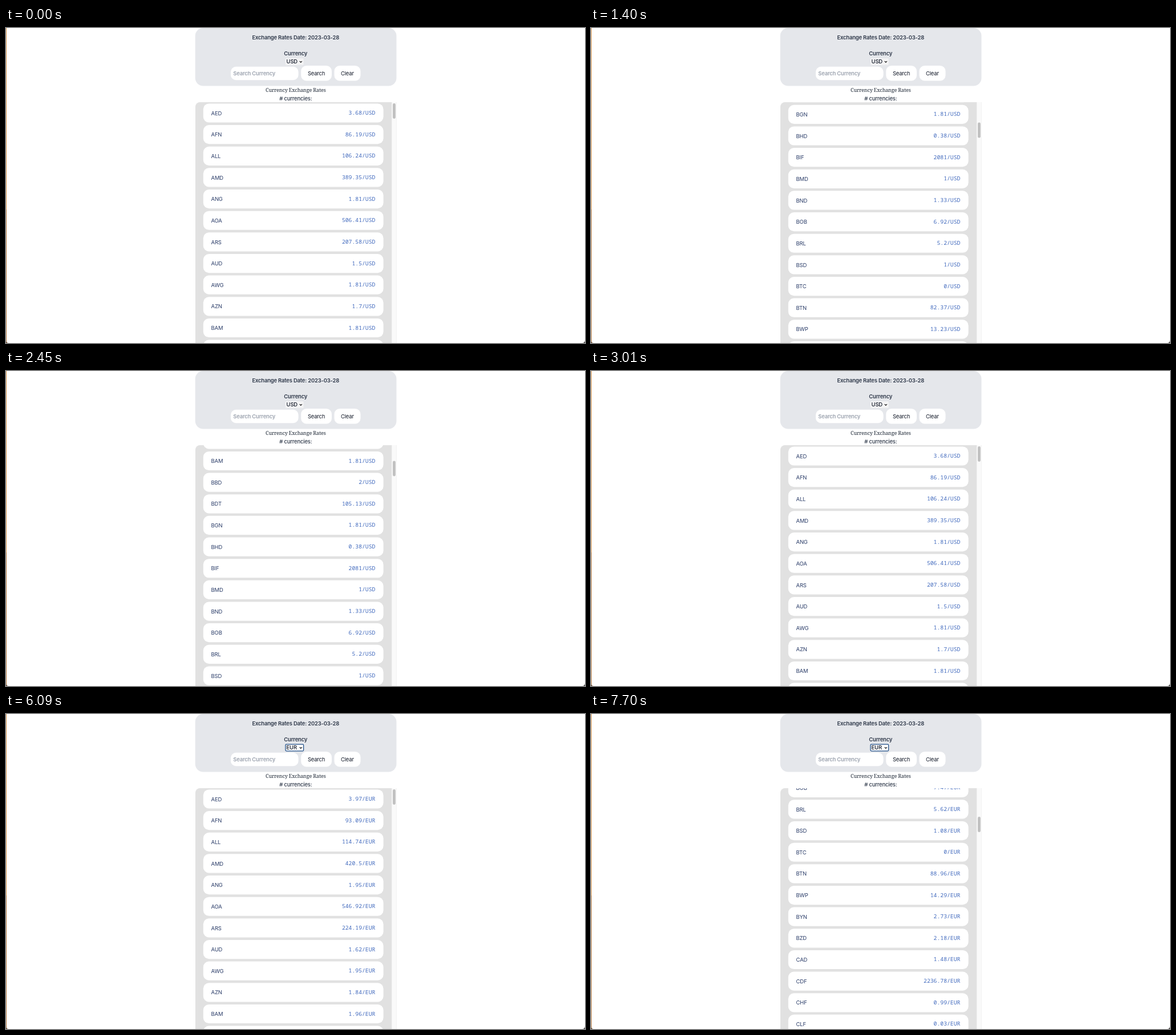
These frames come from a looping animation (1015x552 px, 8000 ms). An HTML page:

```html
<!DOCTYPE html>
<html lang="en">
<head>
<meta charset="utf-8">
<title>Exchange rates</title>
<style>
  html, body { margin: 0; width: 100%; height: 100%; overflow: hidden; background: #fff; }
  svg { display: block; width: 100vw; height: 100vh; }
  text { font: 400 9.47px Inter, sans-serif; letter-spacing: -.021em; fill: #111827; }
  .mid { text-anchor: middle; }
  .medium { font-weight: 500; }
  .semi { font-weight: 600; }
  .slate { fill: #2d3748; }
  .hint { fill: #9ca3af; }
  .serif { font: 400 9px "Noto Serif", serif; letter-spacing: -.15px; fill: #1f2937; }
  .code { fill: #2a3c68; }
  .rate { font: 400 9.75px "Noto Sans Mono", monospace; letter-spacing: 0; text-anchor: end; fill: #4069bd; }
</style>
</head>
<body>
<svg viewBox="0 0 1015 552" preserveAspectRatio="none">
  <defs>
    <clipPath id="view"><path d="M332 552V138a8 8 0 0 1 8-8H676V552Z"/></clipPath>
    <filter id="shade" x="-30%" y="-30%" width="160%" height="160%">
      <feDropShadow dx="0" dy="1.5" stdDeviation="1.8" flood-opacity=".28"/>
    </filter>
  </defs>

  <rect width="1015" height="552" fill="#fff"/>
  <rect width="1" height="318" fill="#dc9a50"/>
  <rect y="318" width="1" height="234" fill="#b87c42"/>
  <path d="M0 547Q0 552 5 552H0Z" fill="#5b3d25"/>
  <path d="M1015 547Q1015 552 1010 552H1015Z" fill="#3a3836"/>

  <rect x="331.7" width="352.8" height="101.5" rx="14" fill="#e5e7eb"/>
  <text class="mid semi slate" x="507.8" y="20">Exchange Rates Date: 2023-03-28</text>
  <text class="mid semi slate" x="507.8" y="48.2">Currency</text>

  <rect id="select" x="490" y="53.2" width="31.6" height="11.6" rx="1.5"/>
  <text id="chosen" class="medium" x="491.6" y="62.3"></text>
  <path d="M514.7 58.1l2.1 2.1 2.1-2.1" fill="none" stroke="#111" stroke-width="1.1"/>

  <g fill="#fff">
    <rect x="394" y="67.8" width="118.6" height="23.4" rx="9"/>
    <rect x="517.2" y="66" width="53.8" height="26.6" rx="9.5"/>
    <rect x="575.5" y="66" width="46" height="26.6" rx="9.5"/>
  </g>
  <text class="semi hint" x="398.2" y="82.9">Search Currency</text>
  <text class="mid" x="544" y="83">Search</text>
  <text class="mid" x="598.4" y="83">Clear</text>

  <text class="mid serif" x="507.8" y="111.8">Currency Exchange Rates</text>
  <text class="mid medium slate" x="507.8" y="126.6"># currencies:</text>

  <g clip-path="url(#view)">
    <rect x="331" y="130" width="346" height="422" fill="#e1e1e1"/>
    <g id="list"></g>
  </g>
  <rect x="676" y="130" width="8.6" height="422" fill="#fafafa"/>
  <path d="M676.3 130V552M684.3 130V552" stroke="#ececec" stroke-width=".6"/>
  <rect id="thumb" x="678" width="4.9" height="27" rx="2.45" fill="#c1c1c1"/>

  <g id="menu">
    <rect x="484.6" y="50" width="42.6" height="51" rx="4" fill="#ebe5e1"
      stroke="#aaa6a3" stroke-width=".6" filter="url(#shade)"/>
    <rect id="bar" x="487.4" width="36.8" height="15.2" rx="2.6" fill="#4197fb"/>
    <path id="tick" d="M490.2 60.6l1.8 2.5 3.2-6.2" fill="none" stroke-width="1.1"
      stroke-linecap="round" stroke-linejoin="round"/>
    <g id="options"></g>
  </g>
</svg>

<script>
const LOOP = 8000, STEP = 70, PITCH = 37.65, BAR_RATIO = .069;
const NS = "http://www.w3.org/2000/svg";
const $ = id => document.getElementById(id);

// code, rate per USD, rate per EUR
const RATES = `AED 3.68 3.97,AFN 86.19 93.09,ALL 106.24 114.74,AMD 389.35 420.5,ANG 1.81 1.95,
AOA 506.41 546.92,ARS 207.58 224.19,AUD 1.5 1.62,AWG 1.81 1.95,AZN 1.7 1.84,BAM 1.81 1.96,
BBD 2 2.16,BDT 105.13 113.54,BGN 1.81 1.96,BHD 0.38 0.41,BIF 2081 2247.48,BMD 1 1.08,
BND 1.33 1.44,BOB 6.92 7.47,BRL 5.2 5.62,BSD 1 1.08,BTC 0 0,BTN 82.37 88.96,BWP 13.23 14.29,
BYN 2.53 2.73,BZD 2.02 2.18,CAD 1.37 1.48,CDF 2071.09 2236.78,CHF 0.92 0.99,CLF 0.03 0.03,
CLP 793.5 856.98,CNH 6.88 7.43,CNY 6.88 7.43,COP 4698.2 5074.06`
  .split(",").map(row => row.trim().split(" "));

// start time, number of steps, scroll from, scroll to
const SCROLLS = [
  [560, 5, 0, 420],
  [1330, 5, 420, 780],
  [2240, 4, 780, 368],
  [2800, 4, 368, 0],
  [7420, 5, 0, 697.4]
];
const OPEN = 4620, HOVER = 5040, PICK = 5740;

function add(parent, tag, attrs, label = "") {
  const el = document.createElementNS(NS, tag);
  for (const key in attrs) el.setAttribute(key, attrs[key]);
  el.textContent = label;
  return parent.appendChild(el);
}

const rateTexts = RATES.map(([code], i) => {
  const y = 132.4 + i * PITCH;
  add($("list"), "rect", { x: 345.8, y, width: 315.8, height: 33.2, rx: 10, fill: "#fff" });
  add($("list"), "text", { class: "code", x: 359.6, y: y + 20.2 }, code);
  return add($("list"), "text", { class: "rate", x: 647.4, y: y + 19.6 });
});

const options = ["USD", "EUR", "CAD"].map((name, i) =>
  add($("options"), "text", { class: "medium", x: 498, y: 63 + i * 15.2 }, name));

const smooth = p => p * p * (3 - 2 * p);

function scrollAt(t) {
  let pos = 0;
  for (const [start, steps, from, to] of SCROLLS) {
    if (t < start) break;
    const k = Math.min((t - start) / STEP, steps - 1);
    pos = from + (to - from) * smooth((k + .143) / (steps - 1 + .143));
  }
  return pos;
}

let unit = "";
function setUnit(next) {
  if (unit === next) return;
  unit = next;
  const col = unit === "USD" ? 1 : 2;
  rateTexts.forEach((el, i) => { el.textContent = RATES[i][col] + "/" + unit; });
}

function drawMenu(t) {
  const shown = t >= OPEN && t < PICK + 4 * STEP;
  $("menu").style.display = shown ? "" : "none";
  if (!shown) return;
  const since = (t - PICK) / STEP;
  const active = since === 0 ? -1 : t < HOVER ? 0 : 1;
  $("menu").setAttribute("opacity", since < 2 ? 1 : since < 3 ? .65 : .25);
  $("bar").setAttribute("visibility", active < 0 ? "hidden" : "visible");
  $("bar").setAttribute("y", 52.6 + Math.max(active, 0) * 15.2);
  $("tick").setAttribute("stroke", active === 0 ? "#fff" : "#222");
  options.forEach((el, i) => { el.style.fill = i === active ? "#fff" : "#222"; });
}

function draw(time) {
  const t = Math.floor((time % LOOP) / STEP) * STEP;
  const pos = scrollAt(t);
  $("list").setAttribute("transform", `translate(0 ${-pos})`);
  $("thumb").setAttribute("y", 132 + pos * BAR_RATIO);

  const picked = t >= PICK + 3 * STEP;
  $("chosen").textContent = picked ? "EUR" : "USD";
  $("select").setAttribute("fill", picked ? "#fff" : "#f4f4f5");
  $("select").setAttribute("stroke", picked ? "#1f4e87" : "none");
  $("select").setAttribute("stroke-width", 1.3);
  setUnit(t >= PICK + 5 * STEP ? "EUR" : "USD");
  drawMenu(t);
}

const begin = performance.now();
function tick() {
  draw(performance.now() - begin);
  requestAnimationFrame(tick);
}
tick();
</script>
</body>
</html>
```
